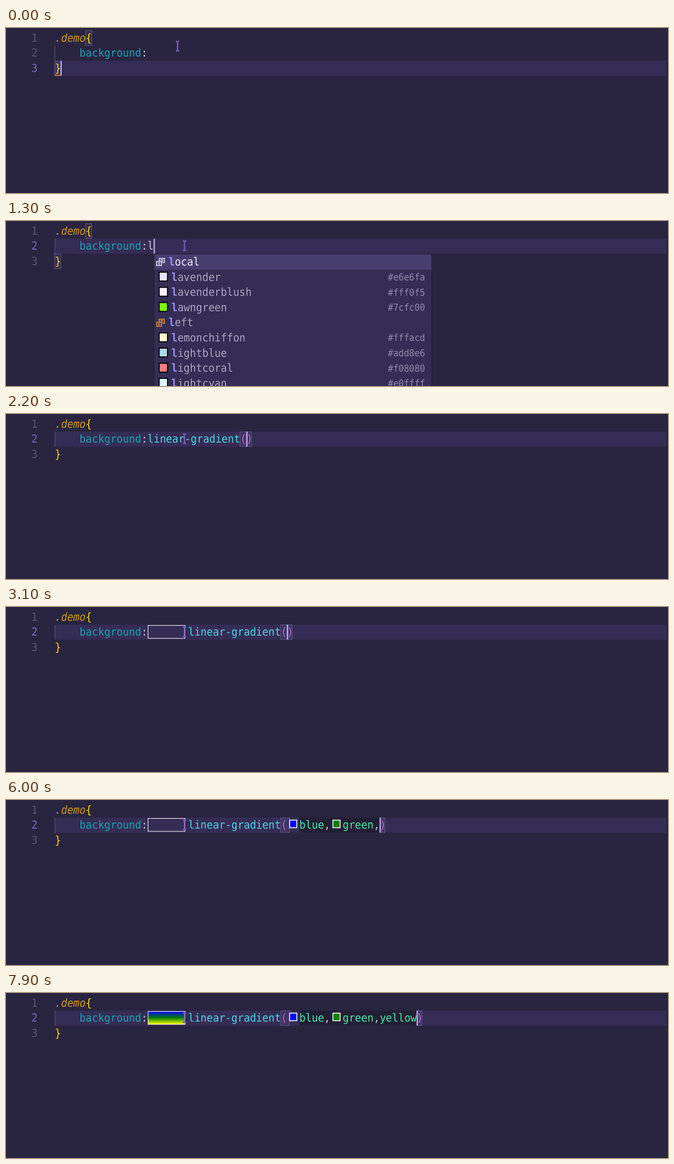
Write an HTML page that moves like this. It is 1200 by 300 pixels and loops after 8000 ms.

```html
<!DOCTYPE html>
<html lang="en">
<head>
<meta charset="utf-8">
<title>Typing a CSS gradient</title>
<style>
  html, body { margin: 0; width: 100%; height: 100%; overflow: hidden; background: #292540; }
  svg { display: block; width: 1200px; height: 300px; }
  text {
    font: 18.6px "DejaVu Sans Mono", "Noto Sans Mono", monospace;
    white-space: pre; text-rendering: geometricPrecision; fill: #c5c2d6;
  }
  .num { fill: #5a5573; } .num.on { fill: #7a6ab8; }
  .sel { fill: #d5971a; font-style: italic; }
  .brace { fill: #ffd700; } .paren { fill: #c368c6; }
  .prop { fill: #16a3b6; } .fn { fill: #49d6e9; } .val { fill: #49e9a6; }
  .item { fill: #aaa6c2; } .item.on { fill: #f0eefa; }
  .hit { fill: #998ef1; font-weight: bold; }
  .hex { fill: #918bad; font-size: 16px; text-anchor: end; }
  .match { fill: #8a78d01c; stroke: #635788; }
</style>
</head>
<body>
<svg viewBox="0 0 1200 300">
  <defs>
    <linearGradient id="two" x2="0" y2="1">
      <stop stop-color="blue"/><stop offset="1" stop-color="green"/>
    </linearGradient>
    <linearGradient id="three" x2="0" y2="1">
      <stop stop-color="blue"/><stop offset=".5" stop-color="green"/><stop offset="1" stop-color="yellow"/>
    </linearGradient>
  </defs>
  <g id="scene"></g>
  <rect id="caret" width="2" height="27" fill="#c9bcff"/>
  <path id="pointer" d="M-3-8.5H3M0-8.5V8.5M-3 8.5H3" fill="none" stroke="#7a5cba" stroke-width="2.4"/>
</svg>
<script>
const LOOP = 8000;
const CHAR = 11.2, LEFT = 88.5, ROW = 27.6, TOP = 4.3;
const VALUE_X = LEFT + 15 * CHAR;
const PREVIEW = 73.7, CHIP = 2 * CHAR;

const menus = {
  l: ['local value', 'lavender #e6e6fa', 'lavenderblush #fff0f5', 'lawngreen #7cfc00', 'left value',
      'lemonchiffon #fffacd', 'lightblue #add8e6', 'lightcoral #f08080', 'lightcyan #e0ffff'],
  li: ['lightblue #add8e6', 'lightcoral #f08080', 'lightcyan #e0ffff', 'lightgoldenrodyellow #fafad2',
       'lightgray #d3d3d3', 'lightgreen #90ee90', 'lightgrey #d3d3d3', 'lightpink #ffb6c1', 'lightsalmon #ffa07a'],
  lin: ['linear-gradient() cube', 'linen #faf0e6', 'lightpink #ffb6c1', 'lightcyan #e0ffff', 'limegreen #32cd32',
        'lightgreen #90ee90', 'lightgoldenrodyellow #fafad2', 'lightsalmon #ffa07a', '-o-linear-gradient() cube']
};

// known: coloured arguments, chips: arguments with a swatch, auto: editor update without a key press
const steps = [
  { at: 0, line: 3 },
  { at: 700, line: 2 },
  { at: 1300, word: 'l' },
  { at: 1600, word: 'li' },
  { at: 1900, word: 'lin' },
  { at: 2100, args: '', raw: true },
  { at: 2200, args: '', auto: true },
  { at: 2500, args: '', preview: 'none', auto: true },
  { at: 3200, args: 'b', preview: 'none' },
  { at: 3300, args: 'bl', preview: 'none' },
  { at: 3600, args: 'blu', preview: 'none' },
  { at: 3800, args: 'blue', preview: 'none' },
  { at: 4000, args: 'blue', known: 1, chips: 1, preview: 'none', auto: true },
  { at: 4300, args: 'blue,', known: 1, chips: 1, preview: 'none' },
  { at: 4600, args: 'blue,g', known: 1, chips: 1, preview: 'none' },
  { at: 4800, args: 'blue,gr', known: 1, chips: 1, preview: 'none' },
  { at: 5000, args: 'blue,gre', known: 1, chips: 1, preview: 'none' },
  { at: 5200, args: 'blue,gree', known: 1, chips: 1, preview: 'none' },
  { at: 5300, args: 'blue,green', known: 1, chips: 1, preview: 'none' },
  { at: 5500, args: 'blue,green', known: 2, chips: 2, preview: 'url(#two)', auto: true },
  { at: 5700, args: 'blue,green,', known: 2, chips: 2, preview: 'url(#two)' },
  { at: 5900, args: 'blue,green,', known: 2, chips: 2, preview: 'none', auto: true },
  { at: 6400, args: 'blue,green,y', known: 2, chips: 2, preview: 'none' },
  { at: 6600, args: 'blue,green,ye', known: 2, chips: 2, preview: 'none' },
  { at: 7000, args: 'blue,green,yel', known: 2, chips: 2, preview: 'none' },
  { at: 7300, args: 'blue,green,yell', known: 2, chips: 2, preview: 'none' },
  { at: 7500, args: 'blue,green,yello', known: 2, chips: 2, preview: 'none' },
  { at: 7700, args: 'blue,green,yellow', known: 2, chips: 2, preview: 'none' },
  { at: 7800, args: 'blue,green,yellow', known: 3, chips: 2, preview: 'url(#three)', auto: true }
];

const rowTop = line => TOP + (line - 1) * ROW;
const baseline = line => rowTop(line) + 20.3;

const rect = (x, y, w, h, attrs) => `<rect x="${x}" y="${y}" width="${w}" height="${h}" ${attrs}/>`;
const text = (x, y, cls, str) =>
  `<text transform="translate(${x} ${y}) scale(1 1.09)" class="${cls}">${str}</text>`;
const match = (x, line, w = CHAR) => rect(x - .3, rowTop(line) + .5, w, ROW - 1, 'class="match"');

function icon(kind, x, y, on) {
  const cube = 'M0-7.5L6.5-4V4.5L0 8-6.5 4.5V-4ZM-6.5-4L0-.5 6.5-4M0-.5V8';
  const value = 'M-2.5-1.5V-6.5H7V1H3.5M0-4H4.5M1.5-1.5H4.5M-7-1H1.5V6.5H-7ZM-4.5 1.5H-1M-4.5 4H-1';
  const color = on ? '#f0eefa' : kind === 'cube' ? '#b180d7' : '#ee9d28';
  return `<path transform="translate(${x} ${y})" d="${kind === 'cube' ? cube : value}"
    fill="none" stroke="${color}" stroke-width="1.5"/>`;
}

// Emphasise the typed letters, in order, inside a suggestion.
function emphasise(label, word) {
  let i = 0;
  return [...label].map(c => c === word[i] ? (i++, `<tspan class="hit">${c}</tspan>`) : c).join('');
}

function menu(word, x) {
  const y = 60.3;
  let out = rect(x, y, 503.5, 260, 'fill="#352d55" stroke="#211d36"') +
    rect(x + .5, y + .5, 502.5, ROW, 'fill="#473e70"');
  menus[word].forEach((entry, i) => {
    const [label, kind] = entry.split(' ');
    const top = y + i * ROW, base = top + 20.7, on = i === 0 ? ' on' : '';
    const isColor = kind[0] === '#';
    out += isColor
      ? rect(x + 9.5, top + 5.2, 15, 16, `fill="${kind}" stroke="#000" stroke-width="1.8"`) +
        text(x + 491.5, base - .6, 'hex', kind)
      : icon(kind, x + 12, top + 14.3, on);
    out += text(x + (isColor ? 31.5 : 26.5), base, 'item' + on, emphasise(label, word));
  });
  if (word === 'lin') out += rect(x + 491.5, y, 12, 240, 'fill="#5a4f8a" opacity=".55"');
  return out;
}

// Draws one editor state and returns the markup and the caret's x.
function draw(s) {
  const line = s.line || 2;
  const inCall = s.args !== undefined && !s.raw;
  let out = rect(LEFT, rowTop(line) + .2, 1197 - LEFT, ROW - .2, 'fill="#352d55"') +
    rect(88, rowTop(2), 1.2, ROW, 'fill="#574b82"');
  for (let n = 1; n <= 3; n++) out += text(46, baseline(n), n === line ? 'num on' : 'num', n);
  if (!inCall) out += match(LEFT + 5 * CHAR, 1) + match(LEFT, 3);

  out += text(LEFT, baseline(1), 'sel', '.demo') +
    text(LEFT + 5 * CHAR, baseline(1), 'brace', '{') +
    text(LEFT + 4 * CHAR, baseline(2), 'prop', 'background') +
    text(LEFT + 14 * CHAR, baseline(2), '', ':') +
    text(LEFT, baseline(3), 'brace', '}');

  if (line === 3) {
    out += '<path d="M88 87l2-2 2 2 2-2 2 2 2-2 1 1" fill="none" stroke="#e66533" stroke-width="1.3"/>';
    return { out, x: LEFT + CHAR - .8 };
  }
  if (s.args === undefined) {
    const word = s.word || '', x = VALUE_X + word.length * CHAR;
    out += text(VALUE_X, baseline(2), '', word);
    if (word) out += menu(word, x + .5);
    return { out, x };
  }
  return drawCall(s, out);
}

function drawCall(s, out) {
  const base = baseline(2), name = 'linear-gradient';
  let x = VALUE_X;
  if (s.preview) {
    out += rect(257.5, 33.5, 67, 23.5, `fill="${s.preview}" stroke="#fff"`);
    x += PREVIEW;
  }
  out += text(x, base, s.raw ? '' : 'fn', name);
  x += name.length * CHAR;
  if (!s.raw) out += match(x, 2, s.chips ? 16 : CHAR);
  out += text(x, base, s.raw ? '' : 'paren', '(');
  x += CHAR;

  const start = x + CHIP;
  let body = '';
  s.args.split(',').forEach((arg, i) => {
    if (i) {
      body += text(x, base, '', ',');
      x += CHAR;
    }
    if (i < s.chips) {
      body += rect(x + 4.8, 36.6, 13, 13.8, `fill="${arg}" stroke="#fff" stroke-width="1.6"`);
      x += CHIP;
    }
    body += text(x, base, i < s.known ? 'val' : '', arg);
    x += arg.length * CHAR;
  });
  if (s.known) out += rect(start, rowTop(2) + .2, x - start, ROW - .4, 'fill="#221f35"');
  out += body;
  if (!s.raw) out += match(x, 2, 9.6);
  out += text(x, base, s.raw ? '' : 'paren', ')');
  return { out, x };
}

const scene = document.getElementById('scene');
const caret = document.getElementById('caret');
const pointer = document.getElementById('pointer');
const views = steps.map(draw);
let shown = -1;

function blink(idle) {
  return idle < 500 ? 1 : .5 + .5 * Math.cos((idle - 500) / 250 * Math.PI);
}

function render(t) {
  let now = 0, lastKey = -400;
  steps.forEach((s, i) => {
    if (s.at > t) return;
    now = i;
    if (i && !s.auto) lastKey = s.at;
  });
  if (now !== shown) {
    scene.innerHTML = views[now].out;
    caret.setAttribute('x', views[now].x);
    caret.setAttribute('y', rowTop(steps[now].line || 2) + .3);
    shown = now;
  }
  caret.setAttribute('opacity', blink(t - lastKey));

  const p = Math.min(1, t / 900), ease = p * p * (3 - 2 * p);
  pointer.setAttribute('transform', `translate(${311 + 12.5 * ease} ${33 + 12 * ease})`);
}

const began = performance.now();
function tick() {
  render((performance.now() - began) % LOOP);
  requestAnimationFrame(tick);
}
tick();
</script>
</body>
</html>
```
